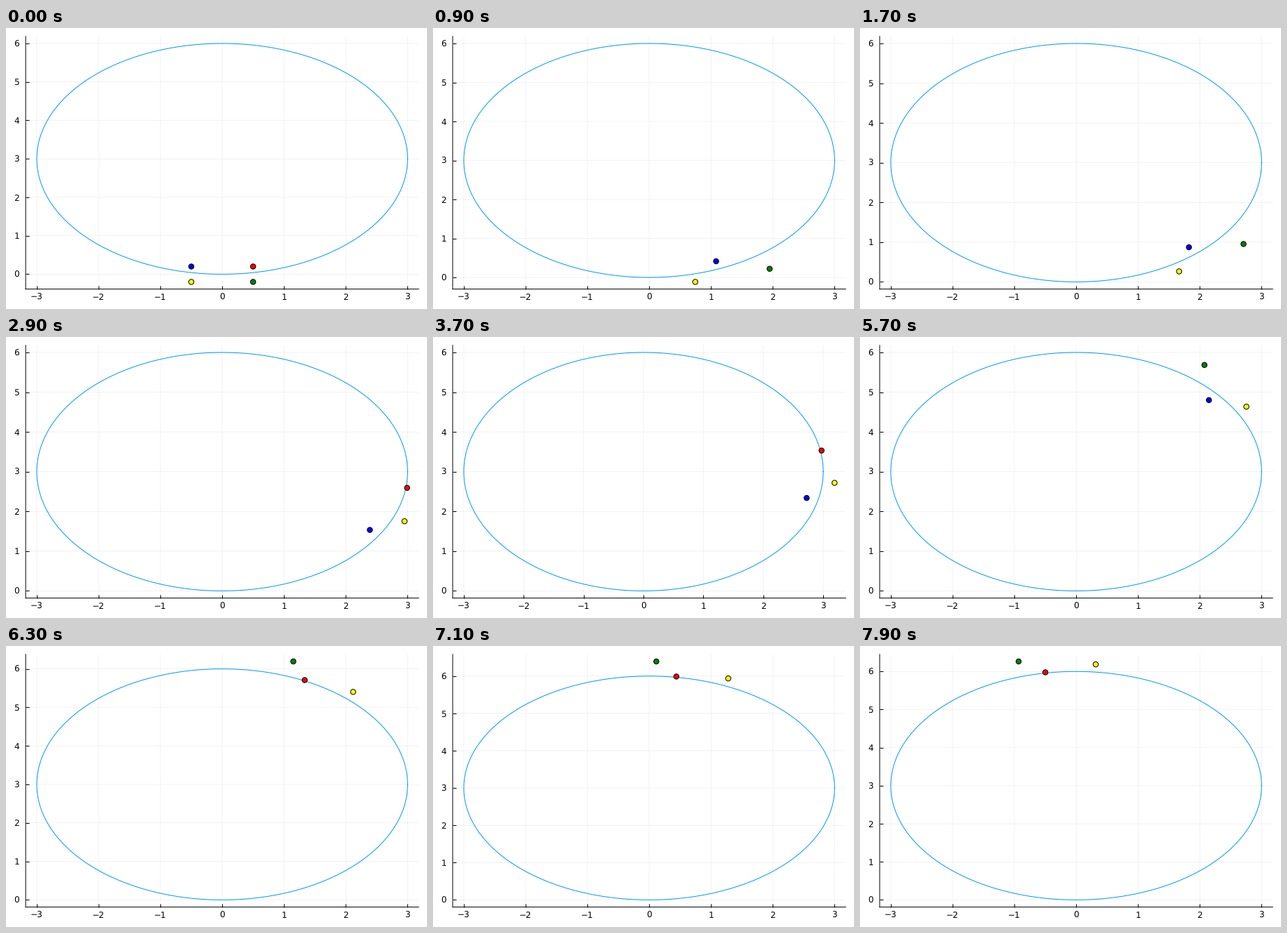
Write a matplotlib script that moves like this. It is 600x400 px and loops after 8000 ms.

```python
import numpy as np
import matplotlib.pyplot as plt
from matplotlib.animation import FuncAnimation

W, H, DPI = 600, 400, 100
PX = 72 / DPI  # one pixel in points

RADIUS = 3.0
START = np.radians(2.19)   # heading of the body at step 0
TURN = np.radians(4.469)   # body turn per step
REACH = 0.63               # how far ahead of its rest place a foot lands

# colour, rest place along and across the body, first step in the air
FEET = [
    ("blue", -0.5, 0.2, 4),
    ("red", 0.5, 0.2, 1),
    ("green", 0.5, -0.2, 3),
    ("yellow", -0.5, -0.2, 2),
]


def foot_place(step, along, across, first):
    """Ground position of a foot, or None while it is lifted."""
    if step < first:
        return along, across
    if (step - first) % 4 == 0:
        return None
    lift = step - (step - first) % 4
    a = START + TURN * lift
    ahead, r = along + REACH, RADIUS - across
    return (ahead * np.cos(a) + r * np.sin(a),
            RADIUS + ahead * np.sin(a) - r * np.cos(a))


def widened(values):
    lo, hi = min(values), max(values)
    pad = 0.03 * (hi - lo)
    return lo - pad, hi + pad


plt.rcParams.update({"font.family": "DejaVu Sans", "path.snap": False,
                     "text.hinting": "none"})
fig = plt.figure(figsize=(W / DPI, H / DPI), dpi=DPI, facecolor="white")
left, right, top, bottom = 28.04, 588.19, 11.81, 371.61
ax = fig.add_axes([left / W, 1 - bottom / H,
                   (right - left) / W, (bottom - top) / H])
ax.spines[["top", "right"]].set_visible(False)
ax.spines[["left", "bottom"]].set_linewidth(PX)
ax.set_axisbelow(True)
ax.grid(color="black", alpha=0.1, linewidth=0.5 * PX)
ax.set_xticks(range(-3, 4))
ax.set_yticks(range(7))
ax.tick_params(direction="in", length=4.72 * PX, width=PX, labelsize=12 * PX)
ax.tick_params(axis="x", pad=6 * PX)
ax.tick_params(axis="y", pad=9 * PX)

t = np.linspace(0, 2 * np.pi, 401)
ax.plot(RADIUS * np.cos(t), RADIUS + RADIUS * np.sin(t),
        color="#009afa", linewidth=PX)
dots = ax.scatter([0] * 4, [0] * 4, s=(7.4 * PX) ** 2,
                  c=[foot[0] for foot in FEET], edgecolors="black",
                  linewidths=PX, clip_on=False, zorder=3)


def draw(i):
    step = (i + 1) // 2
    places, colors = [], []
    for color, *foot in FEET:
        place = foot_place(step, *foot)
        if place is not None:
            places.append(place)
            colors.append(color)
    dots.set_offsets(places)
    dots.set_facecolor(colors)
    xs, ys = zip(*places)
    ax.set_xlim(*widened((-RADIUS, RADIUS) + xs))
    ax.set_ylim(*widened((0, 2 * RADIUS) + ys))
    return [dots]


anim = FuncAnimation(fig, draw, frames=80, interval=100,
                     repeat=True, repeat_delay=0, blit=False)
plt.show()
```
